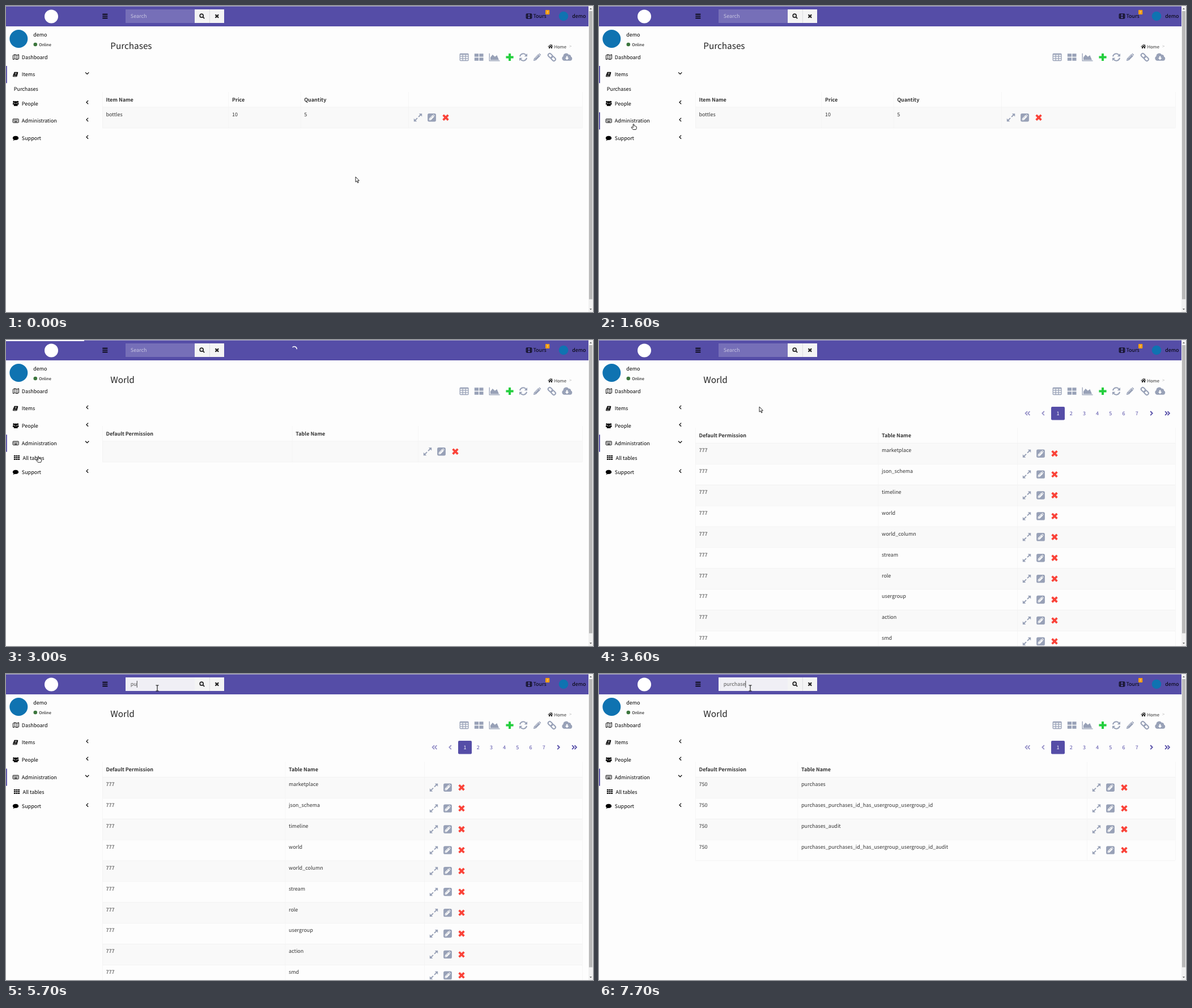
These frames come from a looping animation (1036x541 px, 8000 ms). An HTML page:

```html
<!DOCTYPE html>
<html lang="en">
<head>
<meta charset="utf-8">
<title>Admin tables</title>
<style>
  html, body { margin: 0; width: 100%; height: 100%; overflow: hidden; background: #fdfdfd; }
  #stage { display: block; width: 100vw; height: 100vh; }
  text {
    font: 8.97px "Noto Sans CJK JP", "Noto Sans CJK SC", "Noto Sans CJK", "Noto Sans", sans-serif;
    text-rendering: geometricPrecision;
    fill: #000;
    white-space: pre;
  }
  .title { font-size: 15.3px; fill: #222; }
  .crumb { font-size: 7.68px; fill: #333; }
  .more { font-size: 7.68px; fill: #bbb; }
  .tiny { font-size: 7.04px; }
  .badge { font-size: 5px; fill: #fff; text-anchor: middle; }
  .head { font-weight: bold; fill: #333; }
  .cell { fill: #333; }
  .page { fill: #554da7; text-anchor: middle; }
  .page.on { fill: #fff; }
  .url { font: 8.1px "Noto Sans", sans-serif; fill: #666; }
  .line { fill: none; stroke: currentColor; }
  .fill { fill: currentColor; }
  .hole { fill: none; stroke: #fdfdfd; }
  .tool { color: #98a1b7; }
  .off { opacity: .6; }
</style>
</head>
<body>
<svg id="stage" viewBox="0 0 1036 541" preserveAspectRatio="none">
  <defs>
    <path id="bars" class="line" stroke-width="1.7" d="M-4.5-3.3h9M-4.5 0h9M-4.5 3.3h9"/>
    <g id="search" class="line" stroke-width="1.7"><circle cx="-.8" cy="-.8" r="3"/><path d="M1.4 1.4 4.2 4.2"/></g>
    <path id="clear" class="line" stroke-width="2.3" d="M-2.8-2.8 2.8 2.8M2.8-2.8-2.8 2.8"/>
    <g id="film" class="line"><rect x="-4.8" y="-4" width="9.6" height="8" rx=".8"/><path d="M-2.6-4v8M2.6-4v8M-2.6 0h5.2"/><path stroke-dasharray="1 1" d="M-3.8-4v8M3.8-4v8"/></g>
    <path id="map" class="line" stroke-linejoin="round" d="M-5-3.2-1.8-4.4 1.8-3.2 5-4.4V3.2L1.8 4.4-1.8 3.2-5 4.4ZM-1.8-4.4V3.2M1.8-3.2V4.4"/>
    <g id="book"><path class="fill" d="M-2-4.3H4q1 .2.7 1.1L3 3.2q-.3 1.1-1.3 1.1H-3.6Q-5 4-4.6 2.7Z"/><path class="hole" stroke-width=".8" d="M-1-2.2h3.6M-1.5-.4h3.6M-3.6 2.8H2"/></g>
    <g id="people" class="fill"><circle cx="-3.4" cy="-2.8" r="1.6"/><circle cx="3.4" cy="-2.8" r="1.6"/><circle cy="-1.9" r="2.3"/><path d="M-5.3 2V.2Q-5-1.2-3-.8L-2 .6-3.6 2ZM5.3 2V.2Q5-1.2 3-.8L2 .6 3.6 2ZM-3.4 4.4Q-3.8.5-1.6.5H1.6Q3.8.5 3.4 4.4Z"/></g>
    <g id="keyboard" class="line"><rect x="-5" y="-3.2" width="10" height="6.4" rx=".6"/><path stroke-dasharray="1 .7" d="M-3.6-1.3h7.2M-3.6.2h7.2"/><path d="M-2.4 1.7h4.8"/></g>
    <path id="comment" class="fill" d="M0-3.9C3-3.9 5.2-2.3 5.2-.2S3 3.4 0 3.4Q-1 3.4-1.8 3.2-3 4.4-4.6 4.5-3.5 3.4-3.5 2.4-5.2 1.4-5.2-.2C-5.2-2.3-3-3.9 0-3.9Z"/>
    <path id="grid" class="line" stroke-width="2.2" stroke-dasharray="2.9 .75" d="M-5.1-3h10.2M-5.1 0h10.2M-5.1 3h10.2"/>
    <path id="left" class="line" stroke-width="1.2" d="M1.6-3.1-1.5 0 1.6 3.1"/>
    <path id="down" class="line" stroke-width="1.2" d="M-3.1-1.6 0 1.5 3.1-1.6"/>
    <path id="home" class="fill" d="M-4.6.1 0-3.8 1.7-2.4V-3.3H3V-1.2L4.6.1 4 .8 0-2.5-4 .8ZM-3 .8 0-1.7 3 .8V3.5H.8V1.2H-.8V3.5H-3Z"/>

    <g id="table" class="line" stroke-width="1.3"><rect x="-7.4" y="-6" width="14.8" height="12" rx="1"/><path d="M-7.4-4.6H7.4M-7.4-1.3H7.4M-7.4 2.3H7.4M-2.5-5V6M2.5-5V6"/></g>
    <path id="cards" class="line" stroke-width="5.7" stroke-dasharray="7.2 1.3" d="M-7.9-3.5H7.9M-7.9 3.5H7.9"/>
    <g id="chart"><path class="line" stroke-width="1.3" d="M-8.8-6.8V6.4H9.6"/><path class="fill" d="M-7 5V.2L-3.2-4.6.8-.8 4.4-3.4 8 5Z"/></g>
    <path id="plus" class="line" stroke-width="4" d="M-6.6 0H6.6M0-6.6V6.6"/>
    <g id="refresh"><path class="line" stroke-width="2" d="M-6-1.3A6 6 0 0 1 4.6-3.9M6 1.3A6 6 0 0 1-4.6 3.9"/><path class="fill" d="M7-6.6V-1.3H1.7ZM-7 6.6V1.3H-1.7Z"/></g>
    <g id="pencil"><path class="fill" d="M-6.6 6.6-5.8 2.4 2-5.4 5.4-2-2.4 5.8ZM2.8-6.1Q3.9-7.2 5-6.1L6.1-5Q7.2-3.9 6.1-2.8Z"/><path class="hole" stroke-width=".8" d="M-3.6 2.2 2.2-3.6M-5.2 3.2l2 2"/></g>
    <g id="link" class="line" stroke-width="2" transform="rotate(45)"><rect x="-8" y="-2.9" width="8.6" height="5.8" rx="2.7"/><rect x="-.6" y="-2.9" width="8.6" height="5.8" rx="2.7"/></g>
    <g id="cloud"><path class="fill" d="M-5.2 6.3A4.3 4.3 0 0 1-7-1.7 5.3 5.3 0 0 1 2.9-4.3 3 3 0 0 1 6.6-.9 3.8 3.8 0 0 1 5.6 6.3Z"/><path fill="#fdfdfd" d="M-1.7-1.8H.9V1.2H3.1L-.4 4.7-3.9 1.2H-1.7Z"/></g>

    <g id="expand"><path class="line" stroke-width="1.9" d="M-5.2 5.2-1 1M1-1 5.2-5.2"/><path class="fill" d="M-7.2 7V1.6L-1.8 7ZM7.2-7V-1.6L1.8-7Z"/></g>
    <g id="edit"><rect class="fill" x="-7.4" y="-7.2" width="14.8" height="14.4" rx="2.6"/><path fill="#f9f9f9" d="M-4.8 4.7V1.7L1.3-4.4 4.3-1.4-1.8 4.7ZM2-5.1 3-5.6 5.4-3.2 5-2.1Z"/><path class="line" stroke-width=".8" d="M-2.6 1.4 1.4-2.6M-4 2.6l1.6 1.4"/></g>
    <path id="delete" class="line" stroke-width="3.7" d="M-4.4-4.4 4.4 4.4M4.4-4.4-4.4 4.4"/>
    <path id="prev" class="line" stroke-width="1.8" d="M1.8-3.6-1.7 0 1.8 3.6"/>
    <path id="first" class="line" stroke-width="1.8" d="M0-3.4-3.4 0 0 3.4M4.4-3.4 1 0 4.4 3.4"/>

    <path id="arrow" fill="#fff" stroke="#111" stroke-width=".9" d="M0 0V9.2L2.1 7.3 3.7 10.7 5.1 10.1 3.6 6.8H6.4Z"/>
    <path id="hand" fill="#fff" stroke="#111" stroke-width=".9" stroke-linejoin="round" d="M-.9.7Q0-.6.9.7V3.4Q2.2 2.8 2.6 3.8 3.8 3.4 4.1 4.5 5.3 4.3 5.3 5.6V7.5L4.2 10H-.9L-3.8 6.6Q-4.2 5-2.6 5.4L-.9 6.6Z"/>
    <path id="beam" fill="none" stroke="#111" stroke-width="1.1" d="M-2.6-5H-.6L0-4.4.6-5H2.6M0-4.4V4.4M-2.6 5H-.6L0 4.4.6 5H2.6"/>
  </defs>
</svg>
<script>
const LOOP = 8000, STEP = 100, ROW = 36.9, ITEM = 30.7, SUB = 20.6;
const PURPLE = '#554da7';
const stage = document.getElementById('stage');
const $ = id => document.getElementById(id);

const text = (x, y, str, cls = '') => `<text x="${x}" y="${y}" class="${cls}">${str}</text>`;
const icon = (id, x, y, color = '#000') =>
  `<use href="#${id}" transform="translate(${x} ${y})" color="${color}"/>`;
const rect = (x, y, w, h, fill, extra = '') =>
  `<rect x="${x}" y="${y}" width="${w}" height="${h}" fill="${fill}" ${extra}/>`;
const group = (id, body) => `<g id="${id}">${body}</g>`;

// Menu entries are drawn around a row centre at y = 0.
const menuItem = (id, name, glyph, glyphX, foldable = true) => group(id,
  rect(0, -15, 1.8, 30.4, PURPLE, 'class="bar" visibility="hidden"') +
  icon(glyph, glyphX, 0) + text(27.8, 3.5, name) +
  (foldable ? `<g class="closed">${icon('left', 143.5, -2)}</g><g class="open">${icon('down', 143.2, -2)}</g>` : ''));

const subMenu = (id, body) => `<svg id="${id}" width="164" height="${SUB}" overflow="hidden">${body}</svg>`;

// cols: left edge of each column; the last one holds the row actions.
function table(id, top, cols, heads, rows) {
  const actions = cols[cols.length - 1];
  const bottom = top + rows.length * ROW;
  let out = '';
  rows.forEach((cells, i) => {
    const y = top + i * ROW;
    out += rect(170, y, 847, ROW, i % 2 ? '#fdfdfd' : '#f9f9f9') + rect(170, y, 847, .8, '#f1f1f1');
    cells.forEach((cell, c) => out += text(cols[c] + 6.5, y + 16.1, cell, 'cell'));
    ['expand', 'edit', 'delete'].forEach((glyph, k) =>
      out += icon(glyph, actions + 17 + 24.5 * k, y + 18.7, k < 2 ? '#98a1b7' : '#fa4238'));
  });
  out += rect(170, bottom, 847, .8, '#f1f1f1');
  [...cols, 1017].forEach(x => out += rect(x, top - 26.5, .7, bottom - top + 26.5, '#f3f3f3'));
  heads.forEach((head, c) => out += text(cols[c] + 6.5, top - 10, head, 'head'));
  return group(id, out);
}

function pager() {
  let out = rect(798, 118, 24, 23.5, PURPLE, 'rx="2"');
  for (let n = 1; n <= 7; n++)
    out += text(810 + 23.2 * (n - 1), 133.1, n, n === 1 ? 'page on' : 'page');
  const arrow = (id, x, flip, cls) =>
    `<use href="#${id}" class="${cls}" color="${PURPLE}" transform="translate(${x} 129.6) scale(${flip} 1)"/>`;
  return group('pager', out + arrow('first', 756, 1, 'off') + arrow('prev', 784, 1, 'off') +
    arrow('prev', 975, -1, '') + arrow('first', 1003.5, -1, ''));
}

const header =
  rect(0, 0, 1028, 36, PURPLE) + rect(0, 0, 1028, 1, '#a7a4c6') +
  rect(0, 0, 0, 2, '#fff', 'id="progress"') +
  '<circle cx="80" cy="18.5" r="12" fill="#fff"/>' + icon('bars', 174.8, 18) +
  rect(211, 6, 122, 24, '#766fb8', 'id="input"') +
  '<text id="query" x="219.8" y="21.4"></text>' + rect(220, 12, .8, 12, '#222', 'id="caret"') +
  rect(333, 6, 52, 24, '#f4f4f4') + rect(359, 6, .8, 24, '#d9d9de') +
  icon('search', 346, 18, '#222') + icon('clear', 372.3, 18, '#222') +
  '<path id="spinner" class="line" color="#fff" stroke-width="1.5" d="M-3.2-3.2A4.5 4.5 0 0 1 4.5 0"/>' +
  icon('film', 923, 18) + text(930.4, 21.4, 'Tours') +
  rect(952, 7, 7.3, 8, '#f39c12', 'rx="1"') + text(955.7, 12.9, '7', 'badge') +
  '<circle cx="984" cy="18" r="8.3" fill="#0f73b1"/>' + text(999.2, 21.4, 'demo');

const sidebar =
  '<circle cx="22.3" cy="58" r="16" fill="#0f73b1"/>' + text(48.2, 53.8, 'demo') +
  '<circle cx="51.8" cy="68" r="3.3" fill="#3c763d"/>' + text(58.2, 70.7, 'Online', 'tiny') +
  menuItem('dashboard', 'Dashboard', 'map', 17.5, false) +
  menuItem('items', 'Items', 'book', 16.6) +
  subMenu('itemsSub', text(13.8, 14, 'Purchases')) +
  menuItem('folk', 'People', 'people', 17.2) +
  menuItem('admin', 'Administration', 'keyboard', 17.2) +
  subMenu('adminSub', icon('grid', 19, 10.3) + text(29.5, 14, 'All tables')) +
  menuItem('support', 'Support', 'comment', 17);

const toolbar = [['table', 808.6], ['cards', 834.7], ['chart', 862], ['plus', 889], ['refresh', 913],
  ['pencil', 937.5], ['link', 963.3], ['cloud', 990.5]]
  .map(([id, x]) => icon(id, x, 90.5, id === 'plus' ? '#24cf3e' : '#98a1b7')).join('');

const scrollbar =
  rect(1028, 0, 8, 541, '#f1f1f1') + rect(1029, 9, 6, 509.5, '#b9b9b9') +
  '<path fill="#666" d="M1030 6l2-2.6 2 2.6ZM1030 535l2 2.6 2-2.6Z"/>';

const names = ['marketplace', 'json_schema', 'timeline', 'world', 'world_column', 'stream', 'role',
  'usergroup', 'action', 'smd'];
const joined = 'purchases_purchases_id_has_usergroup_usergroup_id';
const matches = ['purchases', joined, 'purchases_audit', joined + '_audit'];
const worldHeads = ['Default Permission', 'Table Name'];

const status = group('status',
  '<path fill="#e8e8e8" stroke="#d2d2d2" stroke-width=".7" d="M0 541V528.5H342q2 0 2 2V541"/>' +
  text(.8, 537.8, 'site.goms.com:8080/in/item/purchases#', 'url'));

stage.insertAdjacentHTML('beforeend',
  rect(0, 0, 1036, 541, '#fdfdfd') +
  '<text id="title" class="title" x="184.3" y="75.7"></text>' +
  icon('home', 961, 71.6, '#222') + text(967.4, 74.6, 'Home', 'crumb') + text(994, 74.4, '&gt;', 'more') +
  toolbar + pager() +
  table('purchases', 178.5, [170, 392.5, 519.7, 710], ['Item Name', 'Price', 'Quantity'], [['bottles', '10', '5']]) +
  table('empty', 178.5, [170, 504.8, 727], worldHeads, [[]]) +
  table('world', 182, [170, 492.5, 738], worldHeads, names.map(n => ['777', n])) +
  table('found', 182, [170, 350.5, 861], worldHeads, matches.map(n => ['750', n])) +
  header + sidebar + scrollbar + status + '<use id="cursor"/>');

const show = (el, on) => el.setAttribute('visibility', on ? 'visible' : 'hidden');
const between = (t, a, b) => t >= a && t < b;
const last = (list, t) => list.filter(entry => entry[0] <= t).pop();

const pointer = [
  [0, 617, 302, 'arrow'], [200, 520, 304, 'arrow'], [400, 330, 275, 'arrow'], [600, 237, 258, 'arrow'],
  [900, 237, 258, 'arrow'], [1200, 150, 235, 'hand'], [1600, 61, 208.5, 'hand'], [1900, 57.5, 207, 'hand'],
  [3100, 57.3, 206.2, 'hand'], [3300, 110, 190, 'arrow'], [3600, 283, 118, 'arrow'],
  [3700, 293, 57, 'arrow'], [4000, 267, 25, 'beam']];
const typing = [[0, 0], [5400, 1], [5600, 2], [6100, 3], [6400, 4], [6500, 5], [6700, 6], [6900, 7], [7400, 8]];
const loading = [[0, 0], [2900, 50], [3000, 138], [3100, 420], [3200, 800], [3300, 0]];
const pages = [[0, 'purchases'], [2600, 'empty'], [3300, 'world'], [7700, 'found']];

function drawPointer(t) {
  const from = last(pointer, t);
  const to = pointer[pointer.indexOf(from) + 1] || from;
  const k = to === from ? 0 : (t - from[0]) / (to[0] - from[0]);
  const x = from[1] + (to[1] - from[1]) * k, y = from[2] + (to[2] - from[2]) * k;
  $('cursor').setAttribute('href', '#' + from[3]);
  $('cursor').setAttribute('transform', `translate(${x} ${y})`);
}

function drawMenu(t) {
  const p = Math.min(1, Math.max(0, (t - 1790) / 500));
  const slide = .5 - Math.cos(Math.PI * p) / 2;
  const folded = p === 1;
  let y = 74.9;
  const place = (id, open, bar) => {
    const el = $(id);
    el.setAttribute('transform', `translate(0 ${y + ITEM / 2})`);
    y += ITEM;
    show(el.querySelector('.bar'), bar);
    if (el.querySelector('.open')) {
      show(el.querySelector('.open'), open);
      show(el.querySelector('.closed'), !open);
    }
  };
  const placeSub = (id, part) => {
    $(id).setAttribute('y', y);
    $(id).setAttribute('height', SUB * part);
    show($(id), part > 0);
    y += SUB * part;
  };
  place('dashboard', false, false);
  place('items', !folded, !folded);
  placeSub('itemsSub', 1 - slide);
  place('folk', false, false);
  place('admin', folded, t >= 1500);
  placeSub('adminSub', slide);
  place('support', false, between(t, 1200, 1500));
}

function drawSearch(t) {
  const typed = 'purchase'.slice(0, last(typing, t)[1]);
  const focused = t >= 4200;
  const query = $('query');
  query.textContent = typed || 'Search';
  query.style.fill = typed ? '#555' : focused ? '#999' : '#c9c6e2';
  $('input').setAttribute('fill', focused ? '#f0eff5' : '#766fb8');
  $('caret').setAttribute('x', typed ? 219.8 + query.getComputedTextLength() : 220);
  show($('caret'), focused && !between(t, 4800, 5300));
}

function draw(t) {
  const page = last(pages, t)[1];
  pages.forEach(([, id]) => show($(id), id === page));
  show($('pager'), t >= 3300);
  $('title').textContent = page === 'purchases' ? 'Purchases' : 'World';
  $('progress').setAttribute('width', last(loading, t)[1]);
  $('spinner').setAttribute('transform', `translate(508.8 16.2) rotate(${(t - 3000) * .9})`);
  show($('spinner'), between(t, 2900, 3300));
  show($('status'), between(t, 1700, 2300));
  drawMenu(t);
  drawSearch(t);
  drawPointer(t);
}

let drawn = -1;
function tick() {
  const t = Math.floor(performance.now() % LOOP / STEP) * STEP;
  if (t !== drawn) draw(drawn = t);
  requestAnimationFrame(tick);
}
tick();
</script>
</body>
</html>
```
